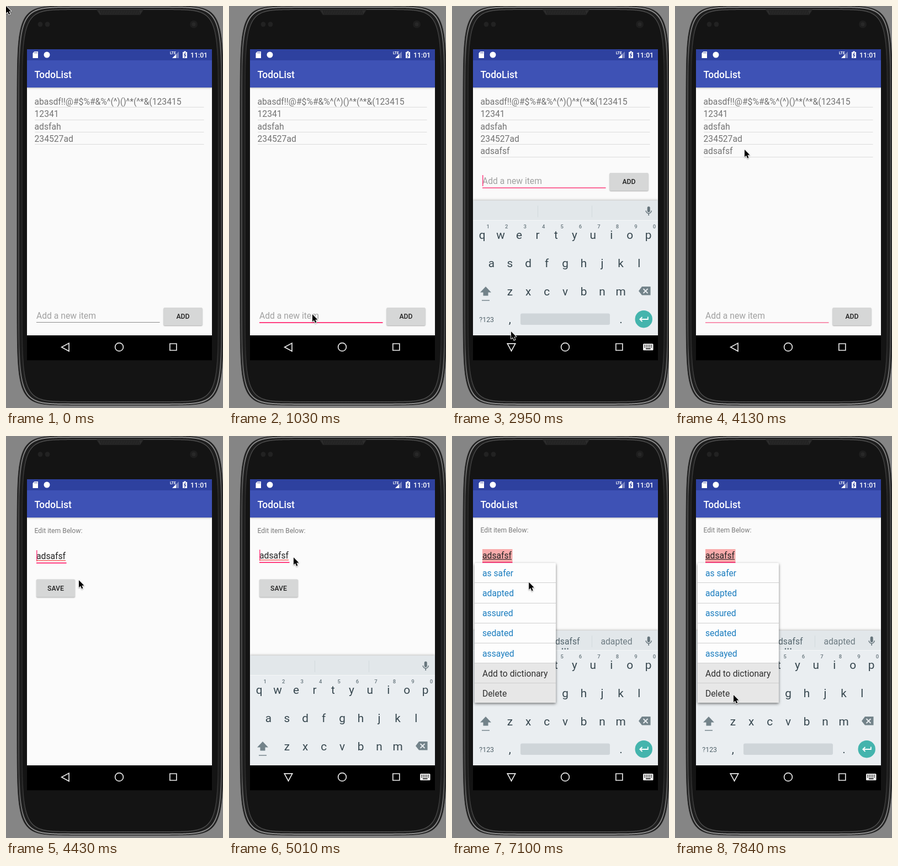
Recreate the animation shown at these times as an HTML page with a canvas. Size 393 px wide and 725 px high, loop 7990 ms.

```html
<!DOCTYPE html>
<html lang="en">
<head>
<meta charset="utf-8">
<title>TodoList</title>
<style>
html, body { margin: 0; width: 100%; height: 100%; overflow: hidden; background: #858585; }
canvas { display: block; width: 393px; height: 725px; }
</style>
</head>
<body>
<canvas id="stage"></canvas>
<script>
const W = 393, H = 725, LOOP = 7990;
const canvas = document.getElementById('stage');
const dpr = window.devicePixelRatio || 1;
canvas.width = Math.round(W * dpr);
canvas.height = Math.round(H * dpr);
const c = canvas.getContext('2d');

const PINK = '#ff4081', INK = '#212121', KEY = '#37474f', SOFT = '#73838a';
const BODY = 15.7, SMALL = 12.2, STEP = 148;
const WORD = 'adsafsf';
const ITEMS = ['abasdf!!@#$%#&%^(^)()^*(^*&(123415', '12341', 'adsfah', '234527ad'];
const MENU = ['as safer', 'adapted', 'assured', 'sedated', 'assayed', 'Add to dictionary', 'Delete'];

// The picture only advances in these bursts; it rests in between.
const BURSTS = [[160, 1170], [1320, 2360], [2500, 3400], [3550, 4570], [4720, 5300], [7100, 7840]];

// Pointer moves: start, end, x, y
const MOVES = [
  [0, 0, 130, 275], [160, 740, 151, 556], [1170, 1620, 242, 456], [1770, 2360, 318, 317],
  [2650, 2950, 107, 587], [2950, 3100, 106, 613], [3550, 4130, 126, 259],
  [4280, 4430, 132, 260], [4430, 4720, 117, 219], [6950, 7400, 203, 392], [7400, 7840, 106, 467]
];

function rect(x, y, w, h, fill) {
  c.fillStyle = fill;
  c.fillRect(x, y, w, h);
}

function round(x, y, w, h, r, fill) {
  c.beginPath();
  c.roundRect(x, y, w, h, r);
  c.fillStyle = fill;
  c.fill();
}

function disc(x, y, r, fill) {
  c.beginPath();
  c.arc(x, y, r, 0, 7);
  c.fillStyle = fill;
  c.fill();
}

function paint(fill, stroke, width = 1) {
  if (fill) { c.fillStyle = fill; c.fill(); }
  if (stroke) { c.strokeStyle = stroke; c.lineWidth = width; c.stroke(); }
}

function trace(points) {
  c.beginPath();
  for (const [x, y] of points) c.lineTo(x, y);
}

function poly(points, fill, stroke, width) {
  trace(points);
  c.closePath();
  paint(fill, stroke, width);
}

function line(points, color, width = 1) {
  trace(points);
  paint(null, color, width);
}

function text(s, x, y, size, color, weight = 400, align = 'left') {
  c.font = `${weight} ${size}px Roboto, sans-serif`;
  c.textAlign = align;
  c.fillStyle = color;
  c.fillText(s, x, y);
  return c.measureText(s).width;
}

function shadow(color, blur, dy) {
  c.shadowColor = color;
  c.shadowBlur = blur * dpr;
  c.shadowOffsetY = dy * dpr;
}

function noShadow() { shadow('transparent', 0, 0); }

// Case outline: a superellipse, inset by d
function shell(d, fill, stroke, width) {
  const bend = v => Math.sign(v) * Math.abs(v) ** .2;
  const points = Array.from({ length: 720 }, (_, i) => {
    const a = i * Math.PI / 360;
    return [206.8 + (186.8 - d) * bend(Math.cos(a)), 360 + (360 - d * .7) * bend(Math.sin(a))];
  });
  poly(points, fill, stroke, width);
}

function shine(edge, middle) {
  const g = c.createLinearGradient(0, 0, 0, 720);
  g.addColorStop(0, edge);
  g.addColorStop(.15, middle);
  g.addColorStop(.85, middle);
  g.addColorStop(1, edge);
  return g;
}

function phone() {
  rect(0, 0, W, H, '#858585');
  shell(0, '#1d1d1d', '#333');
  shell(3, null, shine('#909090', '#4c4c4c'), 2);
  shell(9, '#141414', shine('#505050', '#2c2c2c'), 1.5);
  poly([[164, 7], [249, 7], [243, 16], [170, 16]], '#2b2b2b', '#1c1c1c');
  for (let x = 171; x < 243; x += 3) line([[x, 8], [x + 2, 15]], '#191919');
  for (const x of [62, 75]) disc(x, 33, 4.5, '#222');
  disc(340, 33, 7, '#1e1e1e');
  disc(340, 33, 3.5, '#282828');
}

function statusBar() {
  rect(38, 78, 335, 20, '#2e419f');
  poly([[51.5, 82], [58, 82], [58, 94], [48.5, 94], [48.5, 85]], '#fff');
  for (const x of [52, 54, 56]) line([[x, 83], [x, 85.5]], '#2e419f', .8);
  disc(74, 88, 5.5, '#fff');
  text('LTE', 297, 87, 6.5, '#fff', 700);
  poly([[313, 82], [313, 94], [301, 94]], 'rgba(255,255,255,.35)');
  poly([[308, 87], [308, 94], [301, 94]], '#fff');
  rect(320, 83, 8, 11, '#fff');
  rect(322.3, 81.5, 3.4, 2, '#fff');
  line([[325, 84], [322.8, 88.5], [325.4, 88.5], [323.2, 93]], '#2e419f', 1.3);
  text('11:01', 365, 92.5, SMALL, '#fff', 500, 'right');
}

function appBar() {
  shadow('rgba(0,0,0,.28)', 3, 1);
  rect(38, 98, 335, 49, '#3e52b5');
  noShadow();
  text('TodoList', 51.5, 129.5, 17.45, '#fff', 500);
}

function button(label, x, y, pressed) {
  shadow('rgba(0,0,0,.32)', 2, 1);
  round(x, y, 70, 32, 1.8, pressed ? '#bfc0c0' : '#d6d7d7');
  noShadow();
  text(label, x + 35, y + 20, SMALL, INK, 500, 'center');
}

function caret(x, y) { rect(x, y - 16, 1.5, 20, PINK); }

function listScreen(s) {
  rect(38, 98, 335, 497, '#fafafa');
  s.items.forEach((item, i) => {
    const y = 178 + i * 22.33;
    text(item, 51.5, Math.round(y), BODY, '#737373');
    rect(52, Math.round(y + 4.3), 306.5, 1, '#dcdcdc');
  });
  const y = s.raised ? 321 : 564;
  if (s.typed) {
    const w = text(s.typed, 55, y, BODY, INK);
    rect(55, y + 1.5, w, 1, INK);
    caret(55 + w, y);
  } else {
    text('Add a new item', 55, y, BODY, '#a1a1a1');
    if (s.raised) caret(55, y);
  }
  rect(55, y + 6, 223.5, s.focus ? 2 : 1, s.focus || '#8c8c8c');
  button('ADD', 285.5, y - 20, s.pressed);
  appBar();
}

function editScreen(s) {
  rect(38, 98, 335, 497, '#fbfbfb');
  text('Edit item Below:', 51.5, s.selected ? 174 : 175, SMALL, '#7a7a7a');
  const y = s.keys ? 221 : 222;
  if (s.selected) rect(55, 204, 54.5, 23, '#f9abab');
  const w = text(WORD, 55, y, BODY, INK);
  if (s.selected) rect(55, 222, w, 1, INK);
  else {
    caret(55, y);
    rect(55, y + 2, w, 1.3, '#ef5350');
  }
  rect(55, y + 6, 54.5, 2, PINK);
  if (!s.menu) button('SAVE', 55, 258.5);
  appBar();
}

function menu() {
  shadow('rgba(0,0,0,.5)', 5, 2);
  round(41, 229, 147, 252, 1.5, '#fdfdfd');
  noShadow();
  rect(41, 409, 147, 72, '#e7e7e7');
  MENU.forEach((label, i) => {
    text(label, 55, 252.7 + i * 36.2, BODY, i < 5 ? '#1b7dbf' : '#303030');
    if (i) rect(41, Math.round(228.2 + i * 36.2), 147, 1, '#cfcfcf');
  });
}

function keyRow(chars, x, y, size = 20.8, color = KEY, weight = 400) {
  [...chars].forEach((k, i) => text(k, x + i * 33.45, y, size, color, weight, 'center'));
}

function mic() {
  round(353.7, 361.5, 5, 10.5, 2.5, '#66757c');
  c.beginPath();
  c.arc(356.2, 369, 5, 0, Math.PI);
  paint(null, '#66757c', 1.5);
  line([[356.2, 374], [356.2, 378]], '#66757c', 1.6);
}

function suggestions(words) {
  words.forEach((word, i) => {
    const mid = i === 1;
    text(word, 112 + i * 93, 376, BODY, mid ? '#52636b' : '#6d7b82',
         mid && word.length < 2 ? 700 : 400, 'center');
  });
  for (const dx of [-4.8, 0, 4.8]) disc(204.8 + dx, 383.8, 1.2, '#52636b');
}

function keyboard(s) {
  c.save();
  c.beginPath();
  c.rect(38, 340, 335, 255);
  c.clip();
  c.translate(0, s.slide);
  shadow('rgba(0,0,0,.25)', 4, -1);
  rect(38, 351, 335, 244, '#eaeef1');
  noShadow();
  rect(38, 351, 335, 35, '#e2e7ea');
  rect(38, 386, 335, 1, '#f5f7f8');
  for (const x of [155, 253]) rect(x, 360, 1, 21, '#d2d9dc');
  if (s.guesses) suggestions(s.guesses);
  mic();
  keyRow('qwertyuiop', 54.6, 419.5);
  keyRow('asdfghjkl', 71.3, 470.5);
  keyRow('zxcvbnm', 104.8, 521.5);
  keyRow('1234567890', 65.3, 401, 9.5, '#66757c', 500);
  poly([[61, 506], [71, 516.5], [51, 516.5]], SOFT);
  rect(56.5, 516, 9, 6.5, SOFT);
  rect(54, 530, 14, 1.8, '#8b989e');
  poly([[338, 514], [344, 506], [359.5, 506], [359.5, 521.5], [344, 521.5]], SOFT);
  for (const d of [-4, 4]) line([[350.5 - d, 510], [350.5 + d, 518]], '#eaeef1', 1.8);
  text('?123', 62.7, 569.5, 12.4, '#52636b', 400, 'center');
  text(',', 104.8, 572, 21, KEY, 400, 'center');
  round(124, 554.5, 162, 20.5, 3, '#cfd5d9');
  text('.', 306, 572, 21, KEY, 400, 'center');
  disc(347.2, 564.7, 15.7, '#44b4ad');
  line([[354.8, 560.5], [354.8, 565], [341, 565]], '#fff', 1.8);
  line([[344.5, 561], [340.3, 565], [344.5, 569]], '#fff', 1.8);
  c.restore();
}

function navBar(typing) {
  rect(38, 594, 335, 45, '#000');
  c.save();
  c.translate(107.5, 615.3);
  if (typing) c.rotate(-Math.PI / 2);
  poly([[-6.8, 0], [6.5, -7.2], [6.5, 7.2]], null, '#e8e8e8', 1.7);
  c.restore();
  c.beginPath();
  c.arc(205, 615, 7.4, 0, 7);
  c.rect(296.8, 609, 12, 12);
  paint(null, '#e8e8e8', 1.7);
  if (!typing) return;
  round(346, 609, 18.5, 12, 1.5, '#eee');
  for (let i = 0; i < 10; i++)
    rect(348 + (i % 5) * 3.1, 611 + Math.floor(i / 5) * 3, 1.6, 1.6, '#000');
  rect(351, 617.4, 8.5, 1.5, '#000');
}

function pointer([x, y]) {
  c.save();
  c.translate(x, y);
  c.lineJoin = 'round';
  shadow('rgba(0,0,0,.3)', 2, 1);
  const arrow = [[0, 0], [0, 13.2], [3, 10.5], [5.2, 15.6], [7.4, 14.6], [5.3, 9.7], [9.4, 9.4]];
  poly(arrow, '#fff', '#fff', 1.8);
  noShadow();
  poly(arrow, '#000');
  c.restore();
}

function pointerAt(t) {
  let x = 0, y = 0;
  for (const [start, end, toX, toY] of MOVES) {
    if (t < start) break;
    const k = Math.min(1, (t - start) / Math.max(1, end - start));
    const ease = k * k * (3 - 2 * k);
    x += (toX - x) * ease;
    y += (toY - y) * ease;
  }
  return [x, y];
}

function stepped(time) {
  const [a, b] = BURSTS.findLast(v => v[0] <= time + 6) || [0, 0];
  const gap = (b - a) / Math.round((b - a) / STEP);
  return b ? Math.min(b, a + Math.floor((time + 6 - a) / gap) * gap) : 0;
}

function stateAt(t) {
  const between = (a, b = LOOP) => t >= a - 8 && t < b - 8;
  const s = {
    items: between(2650) ? [...ITEMS, WORD] : ITEMS,
    raised: between(1320, 3550),
    focus: between(3550) ? '#f893b1' : between(2650) ? '#fb6a99' : between(880) ? PINK : null,
    pressed: between(2500, 2650),
    typing: between(1170, 3550) || between(4860),
    keys: between(1320, 3700) || between(5010),
    slide: between(3550, 3700) ? 110 : between(1320, 1470) || between(5010, 5150) ? 45 : 0,
    edit: between(4430) ? 1 : between(4280) ? .6 : 0,
    selected: between(5150),
    menu: between(5300)
  };
  if (between(1620, 2650)) {
    const n = 1 + Math.floor((t - 1612) / STEP);
    s.typed = n > 5 ? WORD : WORD.slice(0, n);
    s.guesses = n > 1 ? ['ads', s.typed, 'adds'] : ['and', s.typed, 'as'];
  }
  if (s.selected || s.typed === WORD) s.guesses = ['as safer', WORD, 'adapted'];
  return s;
}

function draw(time) {
  const t = stepped(time);
  const s = stateAt(t);
  c.setTransform(dpr, 0, 0, dpr, 0, 0);
  phone();
  c.save();
  c.beginPath();
  c.rect(38, 98, 335, 497);
  c.clip();
  if (s.edit < 1) listScreen(s);
  if (s.edit) {
    c.globalAlpha = s.edit;
    c.translate(0, (1 - s.edit) * 50);
    editScreen(s);
  }
  c.restore();
  if (s.keys) keyboard(s);
  if (s.menu) menu();
  statusBar();
  navBar(s.typing);
  pointer(pointerAt(t));
}

const start = performance.now();
function tick() {
  draw((performance.now() - start) % LOOP);
  requestAnimationFrame(tick);
}
tick();
</script>
</body>
</html>
```
